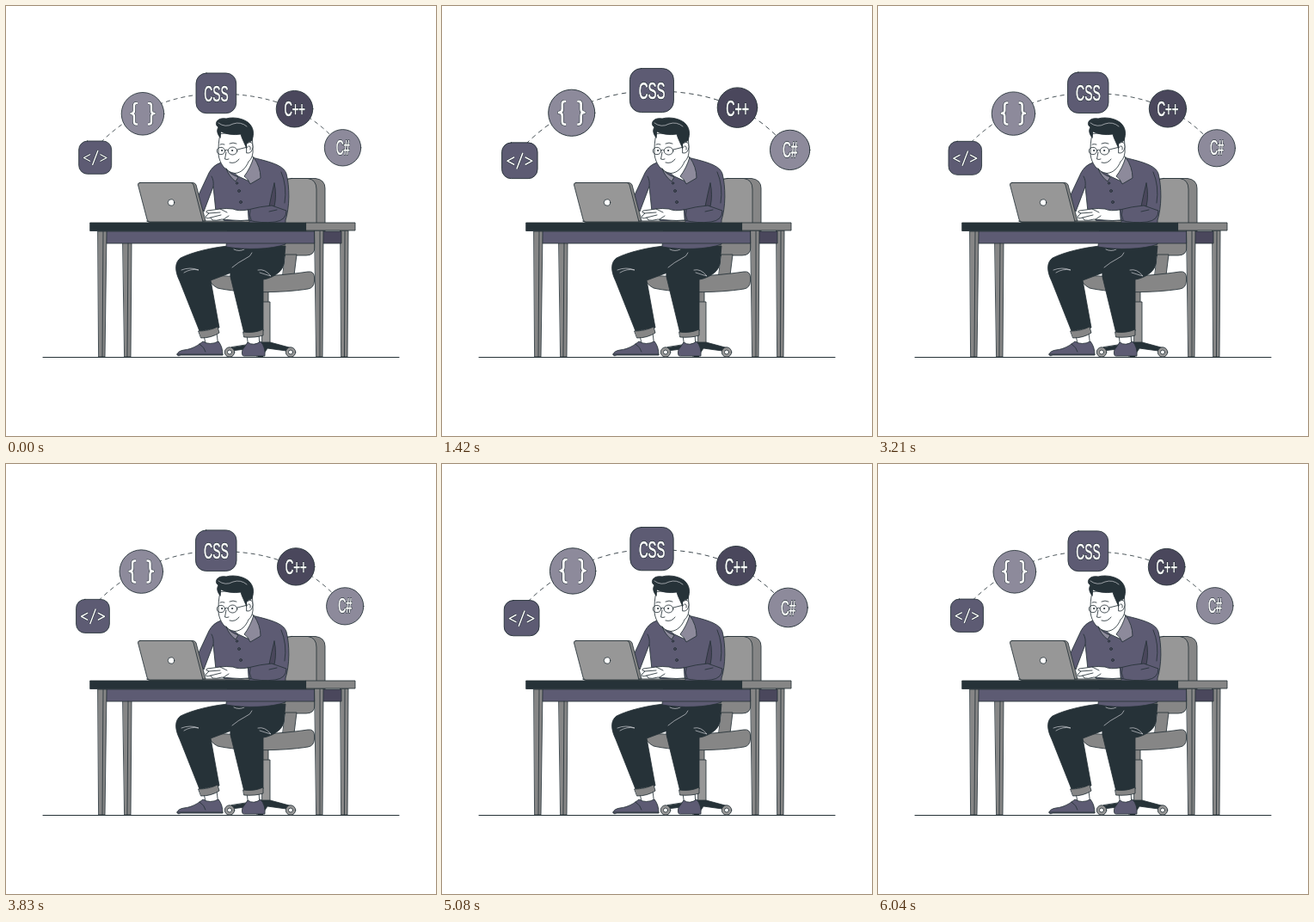
Animation of 500 by 500 pixels, one loop 6.08 s. Source, as an HTML page:

```html
<!DOCTYPE html>
<html lang="en">
<head>
<meta charset="utf-8">
<title>Developer at a desk</title>
<style>
  html, body { margin: 0; width: 100%; height: 100%; overflow: hidden; background: #fff; }
  svg { display: block; width: 100%; height: 100%; }
  .ink { stroke: #263238; stroke-width: .85; stroke-linejoin: round; stroke-linecap: round; }
  .line { fill: none; }
  .dark { fill: #263238; }
  .gray { fill: #979797; }
  .shade { fill: #868686; }
  .violet { fill: #5d5b73; }
  .deep { fill: #4a475c; }
  .pale { fill: #8d8a9b; }
  .skin { fill: #fff; }
  .light { fill: none; stroke: #e8e8ec; stroke-width: .6; stroke-linecap: round; }
  #badges { transform-origin: 249px 136.7px; }
  .label { font-family: "Liberation Sans", Arial, sans-serif; text-anchor: middle;
    fill: #fff; stroke-linejoin: round; }
  .glyph { fill: none; stroke-linejoin: round; stroke-linecap: butt; }
</style>
</head>
<body>
<svg viewBox="0 0 500 500">
  <path class="ink line" style="stroke-width:1" d="M43 408.5H457"/>

  <g class="ink" id="chair">
    <path class="shade" d="M332 200.500H360Q371 202 371 212V262H359V280Q359 290 349 290H318V212Q320 201 332 200.500Z"/>
    <path class="gray" d="M332 200.500H351Q361 202 361 213V262H318V212Q320 201 332 200.500Z"/>
    <path class="shade" d="M325 289H338L335 313H322Z"/>
    <path class="shade" d="M299 328H305V345H299Z"/>
    <path class="gray" d="M298 344H307V393H298Z"/>
    <path class="shade" d="M234 312C270 317 318 314 351 309Q358 308 358.500 315V320Q358 328 351 329C320 334 272 334 246 328Q236 323 234 312Z"/>
    <path class="dark" d="M298 391H307L333 398V402L304 398L298 407H291L294 397L262 401V397Z"/>
    <circle class="gray" cx="260" cy="402.500" r="5.700"/>
    <circle class="skin" cx="260" cy="402.500" r="2.500"/>
    <circle class="gray" cx="331" cy="402.500" r="5.700"/>
    <circle class="skin" cx="331" cy="402.500" r="2.500"/>
    <circle class="dark" cx="296" cy="404" r="4.500"/>
  </g>

  <g class="ink" id="legs">
    <path class="skin" d="M230 383L233 397H247L245 380ZM280 383L282 397H295L294 381Z"/>
    <path class="violet" d="M199 405Q200 401 207 400C217 399 224 394 229 390Q237 395 247 390Q252 396 252 406H203Q199 408 199 405Z"/>
    <path class="violet" d="M275 406Q273 401 277 397L281 391Q288 396 296 390Q302 397 301 407H277Z"/>
    <path class="line" d="M200 405H252M225 393Q231 397 232 402"/>
    <path class="dark" d="M258 279C239 281 217 286 203 293C196 298 196 308 202 320L225 378L248 374L238 319L262 310L300 285Z"/>
    <path class="dark" d="M258 279H325L323 300C321 311 307 317 299 318L299 378L277 381L262 319C258 306 265 299 280 291Z"/>
    <path class="shade" d="M224 378Q236 378 246 373L248 380Q239 386 227 386ZM276 379Q288 381 299 376V383Q290 386 277 385Z"/>
    <path class="light" d="M263 304Q270 298 278 294Q285 291 286 287M265 283Q271 286 277 283M204 307Q214 303 224 307Q215 305 207 310M293 307Q301 305 308 314Q301 312 295 310"/>
  </g>

  <g class="ink" id="man">
    <path class="violet" d="M262 181C249 180 241 185 236 194L221 226L230 239L241 210L244 239L258 254L256 280C278 284 309 283 325 277V249C330 234 330 210 326 195C323 185 306 181 290 177Z"/>
    <path class="deep" d="M312 206Q315 220 312 233H306Q309 218 312 206Z"/>
    <path class="line" d="M241 210Q242 203 239 198M320 193Q327 209 324 229"/>
    <path class="skin" d="M270 183L284 172L289 178L283 204L270 198L260 190Z"/>
    <path class="skin" d="M249 149C247 158 247 164 247 172C248 183 255 193 266 194.500C274 194 279 188 282 181Q288 176 287 165L286 145Z"/>
    <path class="pale" d="M288 176Q296 187 296 200L284 207Q281 200 277 198Q284 189 288 176ZM256 189Q261 196 270 199L267 204Q259 198 256 189Z"/>
    <path class="dark" d="M249 153C245 148 245 144 247 141C241 137 246 129 256 131C266 128 280 132 284 138C289 144 288 152 285.500 157L282 158Q280 161 280 166L276 157Q274 153 273 149Q259 151 250 146Z"/>
    <path class="light" d="M247 136Q255 142 264 137Q273 134 280 140"/>
    <path class="skin" d="M280 160Q287 155 287 164Q286 172 280 171Z"/>
    <g class="line">
      <ellipse cx="250" cy="168.500" rx="4.700" ry="4.200"/>
      <ellipse cx="263.500" cy="168.500" rx="5.300" ry="4.500"/>
      <path d="M254.700 168Q256.500 166 258.200 168M268.800 167L281 164M256 170L254.500 178Q257 179 259 178M260 182Q267 184 271 178M249 161Q251 160 254 161M260 160Q264 158 268 160M282 163Q285 162 284 167"/>
    </g>
    <circle class="dark" cx="251" cy="168" r=".6"/>
    <circle class="dark" cx="263" cy="168" r=".6"/>
    <g class="deep">
      <circle cx="268.500" cy="206" r="1.200"/>
      <circle cx="271" cy="215" r="1.500"/>
      <circle cx="273" cy="228" r="1.500"/>
    </g>
    <path class="violet" d="M281 237Q296 233 309 232L326 238Q326 249 313 251Q296 253 282 249Q279 243 281 237Z"/>
    <path class="line" d="M284 237Q282 243 285 249M306 239L315 237"/>
  </g>

  <g class="ink" id="desk">
    <path class="shade" d="M136 275H146L145 408H138ZM389 261H398L397 408H390Z"/>
    <path class="violet" d="M117 262H359V276H117Z"/>
    <path class="deep" d="M365 262H390V276H365Z"/>
    <path class="shade" d="M107 262H117L115 408H108ZM359 261H369L368 408H361Z"/>
    <path class="line" d="M113 262L112 408M142 276L141 408M365 262V408M394 262L393.500 408"/>
    <path class="dark" d="M98 252H349V261.500H98Z"/>
    <path class="shade" d="M349 252H406V261H349Z"/>
  </g>

  <g class="ink" id="laptop">
    <path class="shade" d="M164 250H274L283 249V251.500H167Z"/>
    <path class="skin" d="M281 237Q270 239 264 236Q256 235 249 236L234 238Q231 240 236 241L232 245Q232 248 238 246L240 249Q244 250 251 248L263 249Q273 250 282 249Z"/>
    <path class="line" d="M236 241L249 240M238 246L250 243M253 248L259 244M249 236L257 240"/>
    <path class="shade" d="M156 205.500H217Q220 205.500 221 208L232 250H222Z"/>
    <path class="gray" d="M156 205.500H215Q217 205.500 218 208L229 251H167Q165 251 164 248L153.500 208Q153 205.500 156 205.500Z"/>
    <circle class="skin" cx="192" cy="228.500" r="3.700"/>
  </g>

  <g id="badges">
    <path class="ink line" stroke-dasharray="5 4" style="stroke-width:.8;stroke-linecap:butt"
      d="M104 165C140 126 190 102 244 102C300 102 350 115 391 165"/>
    <g class="ink">
      <rect class="violet" x="84.700" y="157" width="38" height="38.300" rx="10"/>
      <circle class="pale" cx="159" cy="125.300" r="24.800"/>
      <rect class="violet" x="221" y="78" width="46.700" height="46.700" rx="12"/>
      <circle class="deep" cx="335.500" cy="119.700" r="21.300"/>
      <circle class="pale" cx="391.500" cy="164.800" r="21.200"/>
    </g>
  </g>
</svg>
<script>
  const badges = document.getElementById('badges');
  const NARROW = 0.54;

  function add(tag, attrs, text) {
    const el = document.createElementNS('http://www.w3.org/2000/svg', tag);
    for (const key in attrs) el.setAttribute(key, attrs[key]);
    if (text) el.textContent = text;
    badges.append(el);
  }

  // Lettering in a condensed cut, with a thin dark rim below the white.
  function label(text, x, y, size) {
    const base = {
      class: 'label',
      'font-size': size,
      transform: `translate(${x} ${y}) scale(${NARROW} 1)`,
    };
    add('text', { ...base, 'aria-hidden': true, stroke: '#263238', 'stroke-width': 1.9 }, text);
    add('text', { ...base, stroke: '#fff', 'stroke-width': 0.6 }, text);
  }

  function glyph(d, width) {
    add('path', { class: 'glyph', d, stroke: '#263238', 'stroke-width': width + 1 });
    add('path', { class: 'glyph', d, stroke: '#fff', 'stroke-width': width });
  }

  label('CSS', 244.5, 110.8, 25.5);
  label('C++', 335.6, 128.3, 24);
  label('C#', 391.6, 172.8, 23);
  glyph('M98 172.500L90.500 176.500L98 180.500M107 168L100.500 185M109.500 172.500L117 176.500L109.500 180.500', 1.4);
  glyph('M153 113H151.500Q149 113 149 116V121.500Q149 125 145.500 125Q149 125 149 128.500V134.500Q149 137.500 151.500 137.500H153', 2.5);
  glyph('M165 113H166.500Q169 113 169 116V121.500Q169 125 172.500 125Q169 125 169 128.500V134.500Q169 137.500 166.500 137.500H165', 2.5);

  // Two swells of uneven pace: [time in ms, scale]
  const LOOP = 6080;
  const swell = [[0, 1], [1230, 1.1], [3610, 1], [4780, 1.1], [6065, 1], [LOOP, 1]];
  badges.animate(
    swell.map(([t, s]) => ({ offset: t / LOOP, transform: `scale(${s})` })),
    { duration: LOOP, iterations: Infinity, easing: 'linear' }
  );
</script>
</body>
</html>
```
